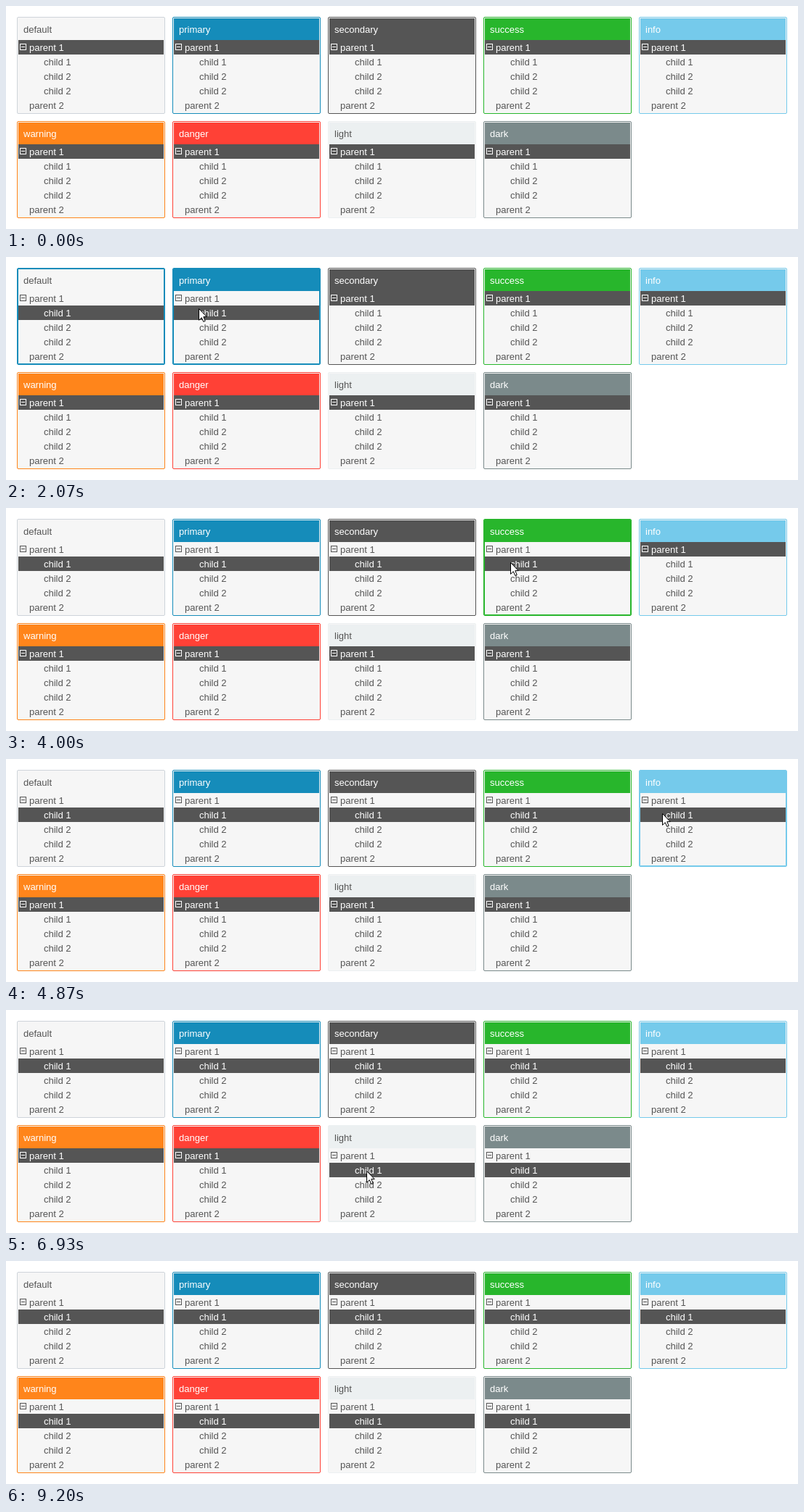
These frames come from a looping animation (1090 px wide and 308 px high, 9.34 s). An HTML page:

```html
<!DOCTYPE html>
<html lang="en">
<head>
<meta charset="utf-8">
<title>Tree panel themes</title>
<style>
html, body { margin: 0; width: 100%; height: 100%; overflow: hidden; background: #fff; }
body { position: relative; font: 13px "Liberation Sans", Arial, sans-serif; color: #555; }
.panel {
  position: absolute; box-sizing: border-box; width: 204px; height: 134px; padding: 1px;
  border: 1px solid var(--edge); border-radius: 2px; background: #f6f6f6;
}
.panel.active { border-color: var(--focus); }
.panel.ring { box-shadow: inset 0 0 0 1px var(--focus); }
.head { height: 30px; line-height: 31px; padding-left: 7px; background: var(--fill); color: var(--ink); }
.row { position: relative; height: 20px; line-height: 21px; padding-left: 15px; white-space: pre; }
.child { padding-left: 35px; }
.row.on { background: #555; color: #fff; }
.toggle {
  position: absolute; left: 2px; top: 5px; box-sizing: border-box;
  width: 9px; height: 9px; border: 1px solid;
}
.toggle::after {
  content: ""; position: absolute; left: 1px; top: 3px; width: 5px; height: 1px; background: currentColor;
}
#cursor { position: absolute; left: 0; top: 0; visibility: hidden; }
</style>
</head>
<body>
<svg id="cursor" width="12" height="19">
  <path d="M.5 .5V16.3L4.2 12.7L6.8 18.4L9.2 17.4L6.8 11.6H11.2Z" fill="#fff" stroke="#000"/>
</svg>
<script>
const LOOP = 9340, TICK = 1000 / 15;
const COLUMNS = 5;
const cursor = document.getElementById('cursor');

const themes = {
  default: '#f6f6f6', primary: '#158cba', secondary: '#555', success: '#28b62c', info: '#75caeb',
  warning: '#ff851b', danger: '#ff4136', light: '#ecf0f1', dark: '#7b8a8b'
};

// Clicks in visiting order, in ticks; the last one releases the focus.
const clicks = [15, 31, 46, 60, 73, 86, 103, 113, 127, 138];
const tips = [
  [52, 77], [265, 71], [503, 78], [694, 75], [903, 75],
  [667, 218], [496, 222], [324, 223], [94, 223]
];
const enter = { at: 11, tip: [9, 112] };
const leave = { at: 133, tip: [82, 290] };

// The pointer rests shortly before and after each click.
const stops = [
  enter,
  ...tips.flatMap((tip, i) => [
    { at: clicks[i] - (i ? 3 : 1), tip },
    { at: clicks[i] + 2, tip }
  ]),
  leave
];

const ease = u => u * u * (3 - 2 * u);

function add(parent, className, text = '') {
  const el = document.createElement('div');
  el.className = className;
  el.textContent = text;
  parent.append(el);
  return el;
}

function makePanel([name, fill], i) {
  const plain = name === 'default';
  const el = add(document.body, 'panel');
  el.style.left = 15 + 214 * (i % COLUMNS) + 'px';
  el.style.top = 15 + 144 * Math.floor(i / COLUMNS) + 'px';
  const vars = {
    fill,
    edge: plain ? '#ced4da' : fill,
    focus: plain ? themes.primary : fill,
    ink: plain || name === 'light' ? '#555' : '#fff'
  };
  for (const key in vars) el.style.setProperty('--' + key, vars[key]);

  add(el, 'head', name);
  const first = add(el, 'row', 'parent 1');
  add(first, 'toggle');
  const child = add(el, 'row child', 'child 1');
  add(el, 'row child', 'child 2');
  add(el, 'row child', 'child 2');
  add(el, 'row', 'parent 2');

  // The top row is visited left to right, the bottom row right to left.
  const visit = i < COLUMNS ? i : 13 - i;
  const lag = plain ? 1 : 0;
  const pick = clicks[visit];
  return { el, first, child, pick, ring: pick + 3 * lag, blur: clicks[visit + 1] + lag };
}

const panels = Object.entries(themes).map(makePanel);
document.body.append(cursor);

function pointAt(tick) {
  const i = stops.findIndex(s => tick < s.at);
  if (i < 1) return null;
  const a = stops[i - 1], b = stops[i];
  const k = ease((tick - a.at) / (b.at - a.at));
  return a.tip.map((v, n) => Math.round(v + (b.tip[n] - v) * k));
}

function draw(time) {
  const tick = Math.floor((time % LOOP + 4) / TICK);
  for (const p of panels) {
    const picked = tick >= p.pick;
    p.first.classList.toggle('on', !picked);
    p.child.classList.toggle('on', picked);
    p.el.classList.toggle('active', picked && tick < p.blur);
    p.el.classList.toggle('ring', tick >= p.ring && tick < p.blur);
  }
  const at = pointAt(tick);
  cursor.style.visibility = at ? 'visible' : 'hidden';
  if (at) cursor.style.transform = `translate(${at[0]}px, ${at[1]}px)`;
}

const start = performance.now();
function loop() {
  draw(performance.now() - start);
  requestAnimationFrame(loop);
}
loop();
</script>
</body>
</html>
```
